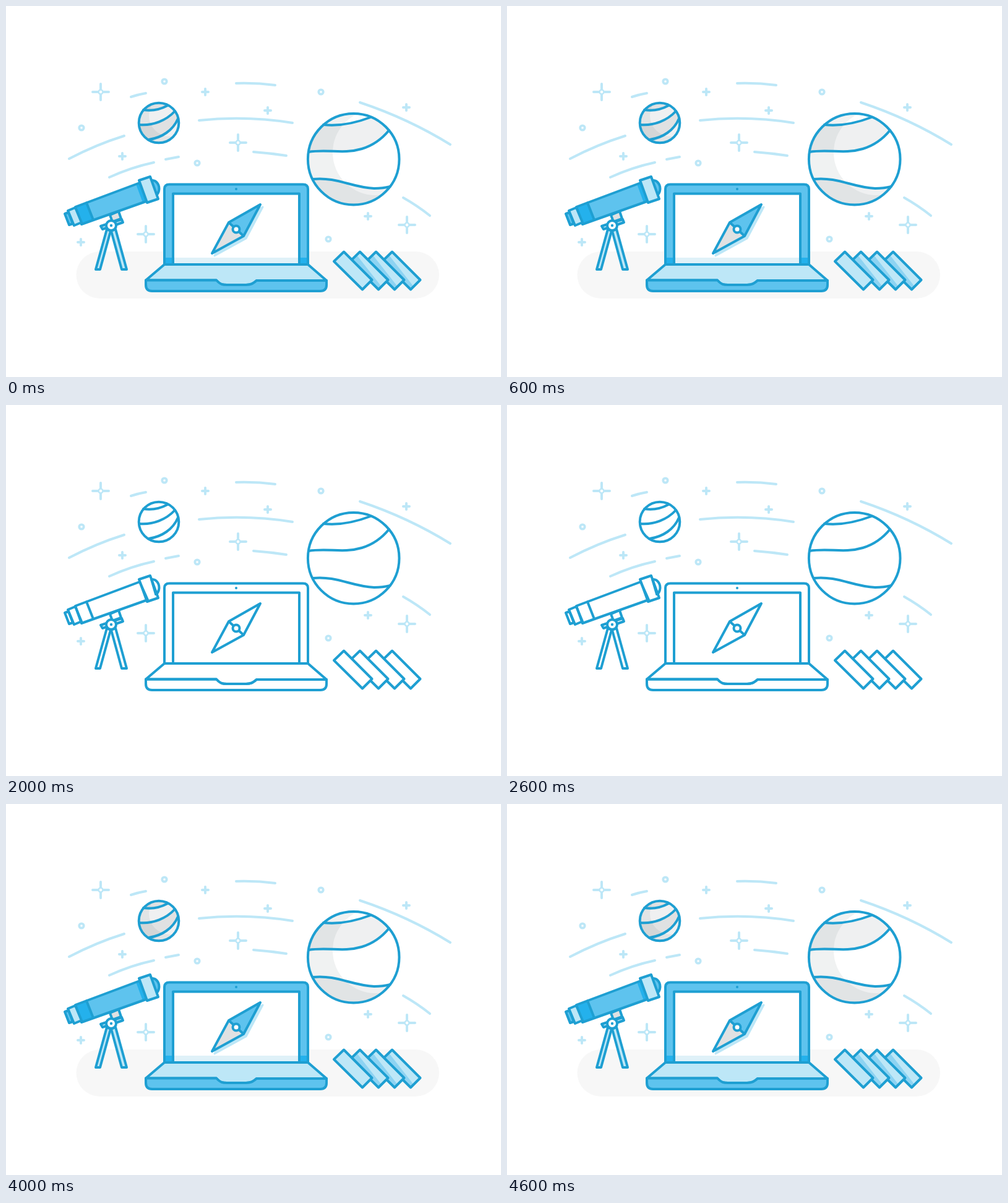
Animation of 800 by 600 pixels, one loop 5 s. Source, as an HTML page with a canvas:

```html
<!DOCTYPE html>
<html lang="en">
<head>
<meta charset="utf-8">
<title>From sketch to illustration</title>
<style>
html, body { margin: 0; width: 100%; height: 100%; overflow: hidden; background: #fff; }
canvas { display: block; }
</style>
</head>
<body>
<canvas id="stage" width="800" height="600"></canvas>
<script>
const ctx = document.getElementById('stage').getContext('2d');
const LINE = '#1e9fd2', LIGHT = '#bde7f7', MID = '#5ec3ee', DEEP = '#24b1ec';
const GREY = '#e0e1e2', PALE = '#eff0f1', SHADE = 'rgba(40,60,70,.065)';
const PEN = '#6c8bc0', WASH = '#e0e4ef', CREAM = '#fff6ea', GROUND = '#e9e9e9';

let level = 0;   // 0 lines, 1 flat colour, 2 colour and shadow

const toPath = d => d instanceof Path2D ? d : new Path2D(d);

function circle(x, y, r, ry = r, turn = 0) {
  const p = new Path2D();
  p.ellipse(x, y, r, ry, turn, 0, Math.PI * 2);
  return p;
}

function fill(d, color) {
  ctx.fillStyle = color;
  ctx.fill(toPath(d));
}

function stroke(d, color = LINE, width = 4) {
  ctx.strokeStyle = color;
  ctx.lineWidth = width;
  ctx.stroke(toPath(d));
}

function shape(d, color) {
  if (level && color) fill(d, color);
  stroke(d);
}

function clipped(d, draw) {
  ctx.save();
  ctx.clip(toPath(d));
  draw();
  ctx.restore();
}

/* ---------- finished illustration ---------- */

function sky() {
  [[153, 139], [375, 221], [226, 369], [648, 354]].forEach(([x, y]) => {
    stroke(`M${x - 13} ${y}h26M${x} ${y - 13}v26`, LIGHT, 4);
    fill(`M${x} ${y - 8}Q${x + 2} ${y - 2} ${x + 8} ${y}Q${x + 2} ${y + 2} ${x} ${y + 8}` +
      `Q${x - 2} ${y + 2} ${x - 8} ${y}Q${x - 2} ${y - 2} ${x} ${y - 8}Z`, LIGHT);
    fill(circle(x, y, 4.5), LIGHT);
    fill(circle(x, y, 2.2), '#fff');
  });
  [[322, 139], [423, 169], [188, 243], [647, 164], [585, 340], [121, 382]].forEach(([x, y]) =>
    stroke(`M${x - 5} ${y}h10M${x} ${y - 5}v10`, LIGHT, 4));
  [[256, 122], [122, 197], [509, 139], [309, 254], [521, 377]].forEach(([x, y]) =>
    stroke(circle(x, y, 3.7), LIGHT, 3.8));
  stroke('M202 147Q214 143 226 141M372 125Q404 124 435 128M312 185Q388 177 463 189' +
    'M102 247Q146 224 191 210M167 277Q202 261 239 253M258 248L279 244' +
    'M400 236Q427 238 453 242M572 156Q650 182 718 224M642 310Q665 323 685 339', LIGHT, 4);
}

function shadeGlobe(x, y, r, lx, ly, lr) {
  const p = new Path2D();
  p.rect(x - r, y - r, 2 * r, 2 * r);
  p.addPath(circle(lx, ly, lr));
  ctx.fillStyle = SHADE;
  ctx.fill(p, 'evenodd');
}

function smallPlanet() {
  const globe = circle(247, 189, 32.3);
  const a = 'M222 168C236 170 250 167 261 161';
  const b = 'M215 192C238 194 259 185 273 170';
  const c = 'M231 216C252 213 270 201 278 182';
  if (level) clipped(globe, () => {
    fill(globe, PALE);
    fill(a + 'L262 150H215Z', GREY);
    fill(b + 'L285 170L278 182C270 201 252 213 231 216L205 216Z', GREY);
    if (level > 1) shadeGlobe(247, 189, 33, 265, 177, 34);
  });
  stroke(a + b + c);
  stroke(globe);
}

function bigPlanet() {
  const globe = circle(561.7, 247.7, 73.8);
  const a = 'M513 192C540 195 568 188 589 180';
  const b = 'M489 236C520 231 545 240 575 231C595 225 610 212 619 201';
  const c = 'M496 280C535 276 560 294 595 295C605 295 613 294 621 292';
  if (level) clipped(globe, () => {
    fill(globe, '#fff');
    fill(b + 'L640 190L589 180C568 188 540 195 513 192L470 200Z', PALE);
    fill(c + 'V340H480Z', PALE);
    if (level > 1) {
      ctx.save();
      ctx.translate(0, 0);
      shadeGlobe(562, 248, 75, 597, 237, 69);
      ctx.restore();
    }
  });
  stroke(a + b + c);
  stroke(globe);
}

function telescope() {
  shape('M163 361L145 426H152L169 364Z', LIGHT);
  shape('M170 364L187 426H195L177 361Z', LIGHT);
  shape('M153 356L187 345L189 350L156 361Z', LIGHT);
  shape('M168 338L182 332L186 344L172 349Z', GREY);
  shape('M235 282C244 281 249 291 247 299Q246 304 242 306Z', MID);
  const tube = 'M112 325L216 286L229 315L122 353Z';
  if (level) fill(tube, MID);
  if (level > 1) {
    fill('M112 325L130 318L141 346L122 353Z', DEEP);
    fill('M210 288L217 286L229 314L221 318Z', DEEP);
  }
  stroke(tube + 'M130 318L141 346');
  shape('M215 282L233 276L246 312L228 318Z', LIGHT);
  shape('M100 331L112 326L122 350L110 355Z', LIGHT);
  shape('M95 336L101 334L108 352L102 354Z', MID);
  fill(circle(170, 355, 8), '#fff');
  stroke(circle(170, 355, 8));
  fill(circle(170, 355, 2.2), LINE);
}

function compass() {
  const needle = 'M411 321L360 350L333 400L384 372Z';
  if (level > 1) {
    ctx.save();
    ctx.translate(4, 4);
    fill(needle, LIGHT);
    stroke(needle, LIGHT, 3);
    ctx.restore();
  }
  if (level) {
    fill('M411 321L360 350L384 372Z', MID);
    fill('M360 350L333 400L384 372Z', GREY);
  }
  stroke(needle + 'M360 350L384 372');
  fill(circle(372, 361, 5.5), '#fff');
  stroke(circle(372, 361, 5.5));
}

function laptop() {
  const lid = 'M256 418V296Q256 288.500 264 288.500H480Q488 288.500 488 296V418Z';
  const screen = 'M270 418V303.500H474V418';
  if (level) {
    fill(lid, MID);
    if (level > 1) fill('M256 407H488V418H256Z', DEEP);
    fill(screen + 'Z', '#fff');
    if (level > 1) fill('M272 407H472V418H272Z', '#dff1f8');
  }
  stroke(lid);
  stroke(screen);
  fill(circle(372, 296, 2), LINE);
  const edge = 'H340C347 451 351 451 357 451H388C396 451 399 449 405 444H518';
  shape('M256 418L226 443.500' + edge + 'L488 418Z', LIGHT);
  shape('M226 443.500' + edge + 'V451Q518 461 508 461H236Q226 461 226 451Z', MID);
  compass();
}

function brochure() {
  for (let i = 3; i >= 0; i--) {
    const x = i * 26;
    ctx.save();
    ctx.translate(x, 0);
    const strip = 'M546 397.500L530 413L576 458.500L591.500 443Z';
    fill(strip, level ? LIGHT : '#fff');
    if (level > 1 && i) fill('M532 411L541 403L581 454L576 458Z', '#8dd3f2');
    stroke(strip);
    ctx.restore();
  }
}

function illustration(n) {
  level = n;
  if (level) {
    const y = level > 1 ? 397 : 403;
    const base = new Path2D();
    base.roundRect(113.500, y, 586.500, 76, 38);
    fill(base, level > 1 ? '#f7f7f7' : PALE);
  }
  sky();
  smallPlanet();
  bigPlanet();
  telescope();
  laptop();
  brochure();
}

/* ---------- pencil sketch ---------- */

let seed = 1;
const rand = () => (seed = seed * 16807 % 2147483647) / 2147483647;
const wobble = n => (rand() - .5) * 2 * n;

function pencil(d, passes = 2, width = 1.3, spread = 1.6) {
  ctx.save();
  ctx.globalAlpha = .8;
  for (let i = 0; i < passes; i++) {
    ctx.save();
    if (i) ctx.translate(wobble(spread), wobble(spread));
    stroke(d, PEN, width);
    ctx.restore();
  }
  ctx.restore();
}

function hatch(area, x0, x1, step, y, dx, dy, color, width) {
  clipped(area, () => {
    for (let x = x0; x < x1; x += step)
      stroke(`M${x + wobble(2)} ${y}l${dx} ${dy}`, color, width);
  });
}

function sketchGround() {
  stroke('M120 408H180M118 424L218 428M118 437L228 437M200 455L240 457M232 470L330 472' +
    'M535 466L610 464M630 436L711 443M655 462L762 467', GROUND, 14);
  stroke('M135 480L198 484M270 488L430 481M440 479L556 479M425 496L664 498' +
    'M254 528L286 528M466 529L574 524', GROUND, 13);
  fill(circle(693, 501, 10, 7), GROUND);
  pencil('M99 462C120 468 135 463 150 461C185 455 172 470 170 477C168 486 180 488 189 488' +
    'M158 503C190 499 215 494 235 499C255 503 255 527 285 527' +
    'M370 471C420 473 465 470 511 459M418 495L455 496' +
    'M371 522C420 523 470 526 500 524C515 522 514 516 505 513' +
    'M298 557C330 565 335 577 367 580M430 578C490 568 550 550 588 528M522 544L572 531' +
    'M375 550C355 538 340 550 352 558C375 568 430 562 492 556C470 551 455 548 443 548' +
    'M375 550C400 560 450 550 488 542L480 552L491 557M620 516H650', 1);
}

function sketchSky() {
  [[219, 104, 14, 13], [613, 132, 21, 20], [413, 252, 9, 9], [106, 181, 17, 10], [119, 194, 10, 9],
   [691, 307, 11, 12], [690, 325, 8, 10], [38, 367, 9, 11], [48, 378, 8, 7]].forEach(([x, y, a, b]) =>
    fill(circle(x, y, a, b), '#fff5e8'));
  pencil('M292 119Q318 114 347 113M382 112Q417 112 451 118M310 166Q370 163 424 168' +
    'M80 249Q100 226 130 214M689 208Q727 245 735 270Q748 310 737 347M640 309Q656 338 652 373', 1);
  [[504, 144, 8], [365, 209, 10], [161, 262, 10], [693, 266, 7], [605, 355, 7], [111, 403, 5]]
    .forEach(([x, y, r]) => pencil(`M${x - r} ${y + 1}l${2 * r} -1M${x} ${y - r}l-1 ${2 * r}`, 2, 1.7, .6));
  [[165, 163, 4], [444, 172, 2.2], [304, 258, 2.7], [721, 392, 4]].forEach(([x, y, r]) =>
    pencil(circle(x, y, r), 2, 1.2, .5));
}

function sketchPlanets() {
  const small = circle(247, 184, 32, 29);
  hatch(small, 196, 270, 13, 214, 54, -32, WASH, 11);
  pencil(small, 3, 1.5);
  pencil(circle(244, 189, 34, 31, .4), 1, 1);
  pencil('M221 193Q245 178 270 166M225 202Q245 188 264 180M219 184Q232 174 247 170', 1);

  const big = circle(557, 256, 82, 69);
  clipped(big, () => {
    stroke('M475 268L545 205M480 282L600 195M495 298L617 212M525 308L618 230' +
      'M505 309L600 275M555 313L630 236M482 250L520 212', WASH, 22);
  });
  pencil(big, 2, 1.5);
  pencil(circle(555, 254, 84, 68, -.1), 1, 1);
  pencil('M477 270C530 262 570 225 586 195M500 305C560 290 610 250 606 197' +
    'M596 297C613 260 620 230 617 205M480 243Q495 205 547 200', 1);
}

function sketchTelescope() {
  const tube = 'M100 325L219 278L227 309L107 349Z';
  const rim = 'M219 270L235 265L246 307L229 314Z';
  const mount = 'M153 333Q163 347 184 343Q198 334 200 318Z';
  fill(mount, WASH);
  fill(tube, WASH);
  fill(rim, WASH);
  fill('M174 350L149 421H160L179 350Z', CREAM);
  pencil(mount, 1);
  pencil(tube + 'M121 318L129 344', 3);
  pencil(rim, 3, 1.5);
  pencil('M87 333L99 328L105 349L93 353ZM90 338L101 333M92 346L98 335L101 346M106 356L110 354', 2, 1.1, 1);
  pencil('M174 350L149 421H163L181 350M159 421V434M181 348L212 420L224 418L185 345M147 422H168', 2);
  fill(circle(177, 346, 5), '#bcc8df');
  pencil(circle(177, 346, 5.5), 2, 1.4, .8);
}

function sketchLaptop() {
  const lid = 'M257 298L490 295L491 414L257 415Z';
  fill(lid, WASH);
  fill('M272 317L474 315L475 414H273Z', CREAM);
  fill('M256 415H491L527 441L229 440Z', '#fff');
  pencil(lid, 3, 1.7);
  pencil('M250 300L491 293M257 290V418M262 299V412M487 296L495 408M271 317L475 315' +
    'M271 316L274 411M474 315L477 413M268 318V408', 2, 1.2);
  pencil(circle(372, 306, 3), 2, 1, .4);
  pencil('M257 414H491L528 443M250 416L229 440M246 420L225 452M491 416L530 442', 3, 1.5);

  const front = 'M232 440L525 441Q526 459 509 464L250 465Q234 463 232 440Z';
  fill(front, '#dce2ef');
  hatch(front, 215, 525, 10, 467, 34, -28, '#9aafd4', 1.2);
  pencil(front, 3, 1.6);
  pencil('M222 462L541 464M226 439L529 440', 1);

  const needle = 'M405 333L357 354L343 394L384 378Z';
  const tail = 'M357 354L343 394L384 378Z';
  fill(needle, '#fffaf3');
  fill(tail, '#b8c4dc');
  hatch(tail, 325, 385, 5, 396, 24, -42, '#4f6b9f', 1.2);
  stroke(needle + 'M357 354L384 378', '#5874aa', 1.8);
  pencil(needle + 'M405 333L371 364', 2, 1.2, 1);
  fill(circle(371, 364, 4), '#7188b4');
  stroke(circle(370, 364, 5), '#5874aa', 1.3);
  fill(circle(294, 374, 1), PEN);
}

function sketchBrochure() {
  fill('M529 414L549 397L570 459L553 468Z', WASH);
  fill('M549 397L572 416L582 456L570 452Z', CREAM);
  fill('M549 397L572 416L602 395L605 451L583 456Z', WASH);
  fill('M602 395L631 405L633 460L605 451Z', CREAM);
  fill('M631 405L647 398L650 444L633 460Z', WASH);
  pencil('M529 414L549 397L572 416L602 395L631 405L647 398L650 444L633 460L604 451L582 457' +
    'M529 414L553 468L570 458M549 397L582 457M602 395L605 451M631 405L633 460', 2, 1.3, 1.5);
  pencil('M525 416L552 394M536 405L561 461M645 396L651 431', 1, 1);
}

function sketch() {
  seed = 4217;
  sketchGround();
  sketchSky();
  sketchPlanets();
  sketchTelescope();
  sketchLaptop();
  sketchBrochure();
}

/* ---------- timeline ---------- */

const steps = [() => illustration(2), sketch, () => illustration(0), () => illustration(1), () => illustration(2)];
const start = performance.now();
let shown = -1;

function tick() {
  const step = Math.floor((performance.now() - start) % 5000 / 1000);
  if (step !== shown) {
    shown = step;
    ctx.fillStyle = '#fff';
    ctx.fillRect(0, 0, 800, 600);
    ctx.lineCap = ctx.lineJoin = 'round';
    steps[step]();
  }
  requestAnimationFrame(tick);
}
tick();
</script>
</body>
</html>
```
